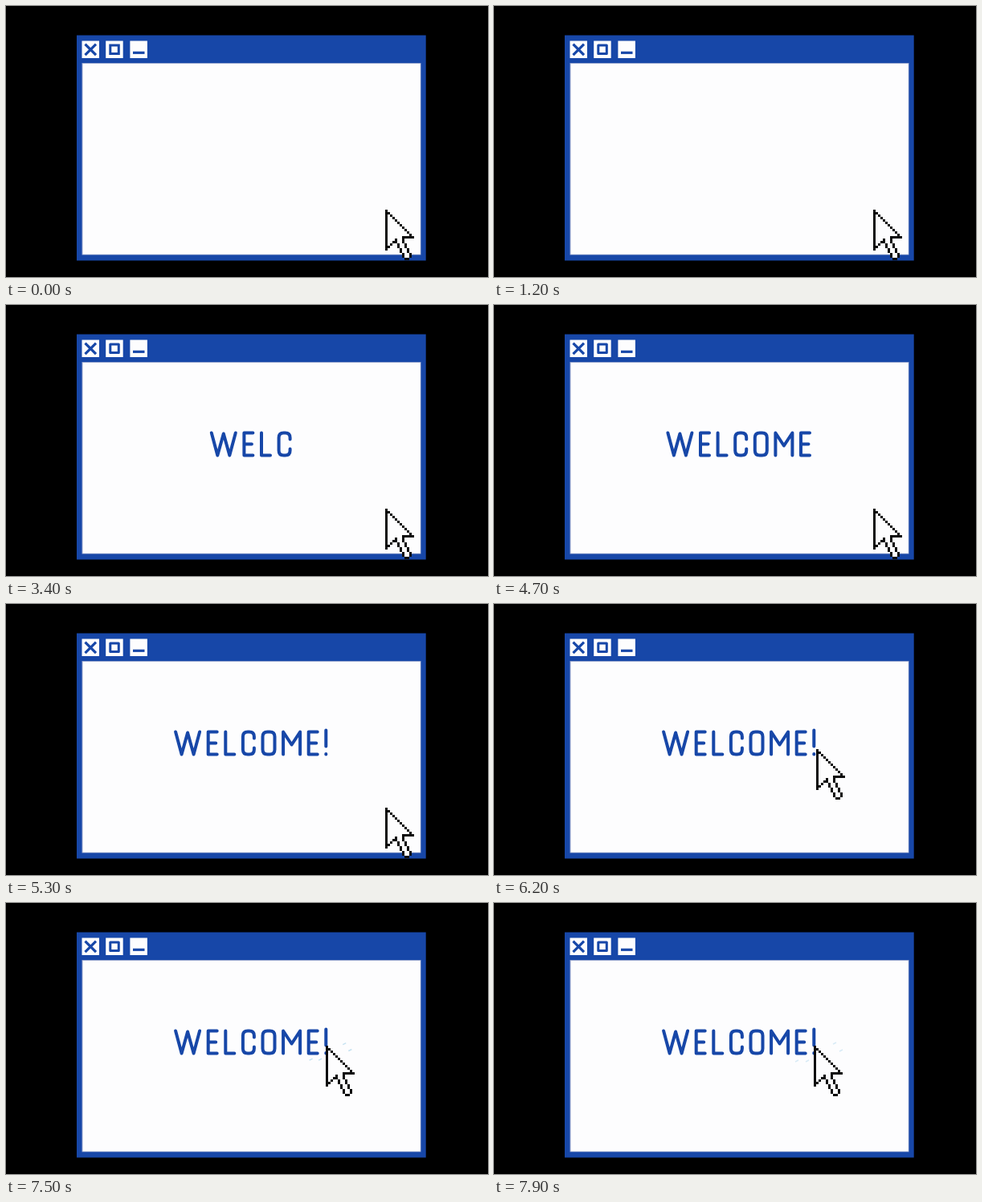
Recreate the animation shown at these times as an HTML page with a canvas. Size 600 by 338 pixels, loop 8 s.

```html
<!DOCTYPE html>
<html lang="en">
<head>
<meta charset="utf-8">
<title>Welcome window</title>
<style>
  html, body { margin: 0; width: 100%; height: 100%; overflow: hidden; background: #000; }
  canvas { display: block; }
</style>
</head>
<body>
<canvas id="stage" width="600" height="338" role="img" aria-label="WELCOME!"></canvas>
<script>
const ctx = document.getElementById('stage').getContext('2d');
const LOOP = 8000, STEP = 100;
const BLUE = '#1747a8', WHITE = '#fdfdfe', INK = '#0c0c0c';

// Monoline lettering: stroke centre lines on a 28px cap height, with outer widths.
const glyphs = {
  W: [34, 'M0 0L7.5 28L15 1L22.5 28L30 0'],
  E: [15, 'M11 0H0V28H11M0 14H9.5'],
  L: [15, 'M0 0V28H11'],
  C: [18, 'M14 8V6Q14 0 8 0H6Q0 0 0 6V22Q0 28 6 28H8Q14 28 14 22V20'],
  O: [19, 'M0 6Q0 0 6 0H9Q15 0 15 6V22Q15 28 9 28H6Q0 28 0 22Z'],
  M: [25, 'M0 28V0L10.5 16L21 0V28'],
  '!': [4, 'M0 -2V18M0 27.5V28'],
};
for (const letter in glyphs) glyphs[letter][1] = new Path2D(glyphs[letter][1]);
const GAP = 6.6;

const word = 'WELCOME!';
const typedAt = [1300, 1900, 2400, 2900, 3600, 4000, 4400, 4900];

const arrow = [
  'X', 'XX', 'X.X', 'X..X', 'X...X', 'X....X', 'X.....X', 'X......X',
  'X.......X', 'X........X', 'X.........X', 'X......XXXXX', 'X...X..X',
  'X..XX..X', 'X.X  X..X', 'XX   X..X', 'X     X..X', '      X..X',
  '       X..X', '       X..X', '        XX',
];

const clamp01 = v => Math.min(1, Math.max(0, v));
const progress = (t, from, to) => clamp01((t - from) / (to - from));
const easeInOut = p => p * p * (3 - 2 * p);
const mix = (a, b, p) => a + (b - a) * p;

function box(color, x, y, w, h) {
  ctx.fillStyle = color;
  ctx.fillRect(x, y, w, h);
}

function stroke(color, width, path) {
  ctx.strokeStyle = color;
  ctx.lineWidth = width;
  ctx.stroke(path);
}

function drawWindow() {
  box('#000', 0, 0, 600, 338);
  box(BLUE, 88, 36.5, 434.7, 281);
  box('#9aa8cf', 94.5, 71, 422, 239.5);
  box(WHITE, 95.5, 72, 420.3, 237.7);
  for (const x of [94.5, 124.2, 154.4]) box(WHITE, x, 43.5, 21.5, 21.5);
  ctx.lineCap = 'butt';
  stroke(BLUE, 3.2, new Path2D('M98.5 47.7L112 61.2M112 47.7L98.5 61.2'));
  stroke(BLUE, 3, new Path2D('M129.8 49H140.3V59.6H129.8Z'));
  box(BLUE, 158, 56.7, 14.5, 3.2);
}

function drawWord(text) {
  const letters = [...text].map(letter => glyphs[letter]);
  const width = letters.reduce((sum, [w]) => sum + w + GAP, -GAP);
  ctx.lineCap = ctx.lineJoin = 'round';
  let x = 304.7 - width / 2;
  for (const [w, path] of letters) {
    ctx.save();
    ctx.translate(x + 2, 159.5);
    stroke(BLUE, 4, path);
    ctx.restore();
    x += w + GAP;
  }
}

// Faint dashes that fly out from the click and fade.
function drawClick(t) {
  if (t < 7200) return;
  const p = progress(t, 7200, 7900);
  ctx.save();
  ctx.globalAlpha = mix(0.6, 0.3, p);
  ctx.lineCap = 'butt';
  const reach = mix(0.65, 1, 1 - (1 - p) ** 2);
  for (const [x, y] of [[24, -5], [32, 4], [-23, 17], [-10, 17]]) {
    const dash = new Path2D();
    dash.moveTo(400 + x * reach - 2, 180 + y * reach + 1);
    dash.lineTo(400 + x * reach + 2, 180 + y * reach - 1);
    stroke('#86c3e4', 1.5, dash);
  }
  ctx.restore();
}

function drawCursor(t) {
  const p = easeInOut(progress(t, 5500, 6300));
  const left = Math.round(mix(472, 398, p)), top = Math.round(mix(254, 178, p));
  arrow.forEach((row, y) => [...row].forEach((cell, x) => {
    if (cell !== ' ') box(cell === 'X' ? INK : WHITE, left + x * 3, top + y * 3, 3, 3);
  }));
}

function draw(now) {
  const t = Math.floor(now % LOOP / STEP) * STEP;
  drawWindow();
  drawWord(word.slice(0, typedAt.filter(at => t >= at).length));
  drawClick(t);
  drawCursor(t);
  requestAnimationFrame(draw);
}
requestAnimationFrame(draw);
</script>
</body>
</html>
```
